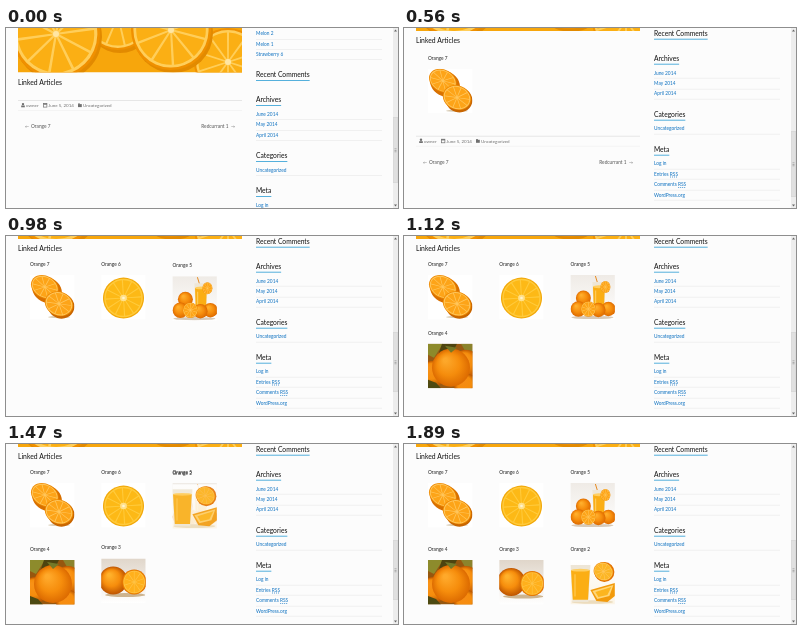
Animation of 392x180 px, one loop 2.1 s. Source, as an HTML page with a canvas:

```html
<!DOCTYPE html>
<html lang="en">
<head>
<meta charset="utf-8">
<title>Linked Articles</title>
<style>
html, body { margin: 0; width: 392px; height: 180px; overflow: hidden; background: #fcfcfc; }
canvas { display: block; }
</style>
</head>
<body>
<canvas id="stage" width="392" height="180"></canvas>
<script>
const ctx = document.getElementById('stage').getContext('2d');
const LOOP = 2100, TICK = 70, SCROLL = 41.3, ROW = 77, FALL = 390, SIZE = 44.5;
const LINK = '#0b70c0';

function rect(x, y, w, h, color) {
  ctx.fillStyle = color;
  ctx.fillRect(x, y, w, h);
}

function oval(x, y, rx, ry, color, rot = 0) {
  ctx.fillStyle = color;
  ctx.beginPath();
  ctx.ellipse(x, y, rx, ry, rot, 0, Math.PI * 2);
  ctx.fill();
}

function poly(color, ...pts) {
  ctx.fillStyle = color;
  ctx.beginPath();
  for (let i = 0; i < pts.length; i += 2) ctx.lineTo(pts[i], pts[i + 1]);
  ctx.fill();
}

// y is the middle of the x-height
function text(str, x, y, size, color, align = 'left') {
  ctx.font = `${size}px Lato, sans-serif`;
  ctx.textAlign = align;
  ctx.fillStyle = color;
  ctx.fillText(str, x, y + size * 0.34);
}

function ball(x, y, r, light = '#ffae2b', dark = '#dd6a00') {
  const g = ctx.createRadialGradient(x - r * 0.3, y - r * 0.4, r * 0.1, x, y, r);
  g.addColorStop(0, light);
  g.addColorStop(0.55, '#f68d0c');
  g.addColorStop(1, dark);
  oval(x, y, r, r, g);
}

function slice(x, y, rx, ry, o = {}) {
  const { rim = '#ee8a00', pith = '#ffc65c', flesh = '#fda418', n = 10, rot = 0 } = o;
  ctx.save();
  ctx.translate(x, y);
  ctx.rotate(rot);
  ctx.scale(rx, ry);
  oval(0, 0, 1, 1, rim);
  oval(0, 0, 0.94, 0.94, pith);
  for (let i = 0; i < n; i++) {
    const a = i / n * Math.PI * 2, half = Math.PI / n - 0.035;
    ctx.fillStyle = flesh;
    ctx.beginPath();
    ctx.moveTo(Math.cos(a) * 0.08, Math.sin(a) * 0.08);
    ctx.arc(0, 0, 0.87, a - half, a + half);
    ctx.fill();
  }
  ctx.restore();
}

function glass(x, y, w, h) {
  poly('#eee6d6', x, y, x + w, y, x + w * 0.9, y + h, x + w * 0.1, y + h);
  poly('#fbae14', x + 0.6, y + h * 0.14, x + w - 0.6, y + h * 0.14,
    x + w * 0.88, y + h * 0.94, x + w * 0.12, y + h * 0.94);
  oval(x + w / 2, y + h * 0.14, w / 2 - 0.6, 1.4, '#ffcf62');
  rect(x + w * 0.2, y + h * 0.25, 1.2, h * 0.6, '#ffca55');
}

function fade(top, bottom) {
  const g = ctx.createLinearGradient(0, 0, 0, SIZE);
  g.addColorStop(0, top);
  g.addColorStop(1, bottom);
  rect(0, 0, SIZE, SIZE, g);
}

const pictures = [
  function halves() {
    rect(0, 0, SIZE, SIZE, '#fff');
    oval(17, 15, 15.5, 12.5, '#d87000', 0.5);
    slice(14.8, 12, 14.5, 11, { rot: 0.5 });
    oval(29, 42, 11, 1.2, '#d8cbb4');
    oval(31, 31, 13.5, 12.5, '#c96600', 0.3);
    slice(29, 28.8, 14.5, 12, { rot: 0.4 });
  },
  function wheel() {
    rect(0, 0, SIZE, SIZE, '#fff');
    slice(22.3, 23, 20.5, 20.5, { rim: '#f2a808', pith: '#ffca3c', flesh: '#fdb916', n: 12, rot: 0.2 });
    oval(22.3, 23, 3.4, 3.2, '#ffe08a');
    oval(22.3, 23, 1.3, 1.3, '#fff3d0');
  },
  function pile() {
    fade('#efebe6', '#fff');
    oval(22, 42.5, 21, 1.6, '#d8cab8');
    ctx.strokeStyle = '#e68b22';
    ctx.beginPath();
    ctx.moveTo(29, 14);
    ctx.lineTo(25, 1);
    ctx.stroke();
    glass(22, 7, 13, 34);
    slice(35, 12, 5, 6);
    ball(13, 23, 7.5);
    ball(8, 34, 7.8);
    ball(38, 34, 7.2);
    ball(28, 35, 7.2);
    slice(18, 34, 7.6, 7.8);
  },
  function tree() {
    rect(0, 0, SIZE, SIZE, '#96570f');
    poly('#8d8b2c', 0, 0, 15, 0, 6, 14, 0, 11);
    poly('#4d4410', 14, 0, 29, 0, 25, 8, 10, 12);
    poly('#8b842d', 33, 0, 44.5, 0, 44.5, 9, 37, 7);
    ball(38, 20, 14, '#ff9d21', '#bd5500');
    ball(5, 30, 13, '#f99216', '#b95400');
    ball(38, 42, 12, '#f78c14', '#b85500');
    ball(23, 24, 19, '#ffa92a', '#dc6a00');
    poly('#4d4a12', 0, 36, 8, 39, 13, 44.5, 0, 44.5);
    poly('#747928', 17, 2, 29, 4, 23, 9);
  },
  function pair() {
    fade('#e0d6ca', '#fff');
    oval(24, 36.5, 20, 2, '#cdb48f');
    ball(12, 22, 14, '#ffb12b', '#bd5400');
    ball(33, 23.5, 12.5);
    slice(33, 23.5, 11.5, 12, { pith: '#ffc245', flesh: '#ffb01c' });
  },
  function juice() {
    fade('#fff', '#fbf3e4');
    oval(22, 42, 21, 1.8, '#ecdcbd');
    ball(34, 12, 10);
    slice(33, 11.5, 10, 9, { rot: 0.5, flesh: '#fcb625' });
    poly('#f29a0b', 20, 30, 44.5, 23, 44.5, 36, 37, 42, 26, 41);
    poly('#ffd678', 22, 31, 43, 25, 39, 36, 27, 39);
    poly('#fcb51f', 25, 32, 41, 27, 37, 35, 28, 37);
    glass(0, 5, 20, 37);
  }
];

const starts = [350, 502, 719, 929, 1144, 1330];
const items = pictures.map((draw, i) => ({
  draw, title: 'Orange ' + (7 - i), start: starts[i],
  x: 24 + (i % 3) * 71.2, y: 39 + Math.floor(i / 3) * ROW
}));

// the CSS "ease" curve
function ease(p) {
  const curve = (a, b, u) => 3 * a * u * (1 - u) ** 2 + 3 * b * u * u * (1 - u) + u ** 3;
  let lo = 0, hi = 1;
  for (let i = 0; i < 20; i++) {
    const mid = (lo + hi) / 2;
    if (curve(0.25, 0.25, mid) < p) lo = mid; else hi = mid;
  }
  return curve(0.1, 1, lo);
}

const keys = [[0, -700], [0.6, 6], [0.8, -2], [1, 0]];
function drop(p) {
  if (p >= 1) return 0;
  const i = keys.findIndex(k => k[0] > p);
  const [a, from] = keys[i - 1], [b, to] = keys[i];
  return from + (to - from) * ease((p - a) / (b - a));
}

function drawItem(item, t) {
  const p = (t - item.start) / FALL;
  if (p < 0) return;
  ctx.save();
  ctx.globalAlpha = p < 0.6 ? ease(p / 0.6) : 1;
  ctx.translate(item.x, item.y + drop(p));
  text(item.title, 0, -10.7, 4.8, '#222');
  ctx.beginPath();
  ctx.rect(0, 0, SIZE, SIZE);
  ctx.clip();
  item.draw();
  ctx.restore();
}

function banner() {
  ctx.save();
  ctx.beginPath();
  ctx.rect(12, -60, 224, 104.3);
  ctx.clip();
  rect(12, -60, 224, 105, '#f7a60c');
  const look = { rim: '#f09000', pith: '#ffce5a', flesh: '#fbaf14' };
  [[222, 34, 34], [112, -12, 34], [50, 6, 44], [165, 2, 40]].forEach(([x, y, r], i) => {
    oval(x + 2, y + 3, r, r, '#e28a00');
    slice(x, y, r, r, { ...look, rot: i * 0.4 });
    oval(x, y, 3, 3, '#ffe6a4');
  });
  ctx.restore();
}

function heading(str, y) {
  text(str, 250, y, 6.7, '#111');
  rect(250, Math.round(y + 5), ctx.measureText(str).width, 1, '#55b0dc');
}

function links(list, y) {
  list.forEach((str, i) => {
    const cy = y + i * 10.45;
    text(str, 250, cy, 4.8, LINK);
    rect(250, Math.round(cy + 5), 126, 1, '#f0f0f0');
    if (str.endsWith('RSS')) {
      const end = 250 + ctx.measureText(str).width;
      for (let x = end - 8; x < end; x += 2) rect(x, cy + 2.5, 1, 0.7, LINK);
    }
  });
}

function sidebar() {
  links(['Melon 2', 'Melon 1', 'Strawberry 6'], 5.5);
  heading('Recent Comments', 47.2);
  heading('Archives', 72);
  links(['June 2014', 'May 2014', 'April 2014'], 86.2);
  heading('Categories', 127.8);
  links(['Uncategorized'], 142);
  heading('Meta', 162.8);
  links(['Log in', 'Entries RSS', 'Comments RSS', 'WordPress.org'], 177);
}

function footer(y) {
  const grey = '#707070';
  rect(12, Math.round(y - 5), 224, 1, '#e6e6e6');
  rect(12, Math.round(y + 5), 224, 1, '#f4f4f4');
  oval(17, y - 1.2, 1.2, 1.2, grey);
  rect(15.2, y + 0.2, 3.6, 1.8, grey);
  text('owner', 20, y, 4.5, grey);
  ctx.strokeStyle = grey;
  ctx.lineWidth = 0.7;
  ctx.strokeRect(37.5, y - 1.8, 3.4, 3.6);
  rect(37.5, y - 1.8, 3.4, 1.2, grey);
  text('June 5, 2014', 42.3, y, 4.5, grey);
  rect(72, y - 1.8, 2, 1, grey);
  rect(72, y - 1.2, 3.8, 3, grey);
  text('Uncategorized', 77, y, 4.5, grey);
  ctx.lineWidth = 1;
  text('←', 19, y + 21.3, 4, '#666');
  text('Orange 7', 25, y + 21.3, 4.8, '#555');
  text('Redcurrant 1', 222.5, y + 21.3, 4.8, '#555', 'right');
  text('→', 229, y + 21.3, 4, '#666', 'right');
}

function scrollbar(top, height) {
  rect(387, 0, 5, 180, '#ededed');
  rect(387, top, 5, height, '#d4d4d4');
  rect(387.5, top + 0.5, 4, height - 1, '#e0e0e0');
  for (let i = -1; i < 2; i++) rect(388.5, top + height / 2 + i * 1.5, 2, 0.7, '#999');
  poly('#666', 388, 3.5, 389.5, 1.5, 391, 3.5);
  poly('#666', 388, 176.5, 389.5, 178.5, 391, 176.5);
}

function render(t) {
  const scrolled = t >= TICK;
  const rows = t < starts[0] ? 0 : t < starts[3] ? 1 : 2;
  rect(0, 0, 392, 180, '#fcfcfc');
  ctx.save();
  if (scrolled) ctx.translate(0, -SCROLL);
  banner();
  text('Linked Articles', 12, 54.2, 6.8, '#111');
  footer(77.3 + rows * ROW);
  sidebar();
  ctx.restore();
  items.forEach(item => drawItem(item, t));
  if (!scrolled) scrollbar(89, 66);
  else if (rows < 2) scrollbar(103, 66);
  else scrollbar(96, 60);
}

// the page repaints at a fixed cadence
function loop() {
  const t = performance.now() % LOOP;
  render(Math.floor(t / TICK) * TICK);
  requestAnimationFrame(loop);
}
loop();
</script>
</body>
</html>
```
